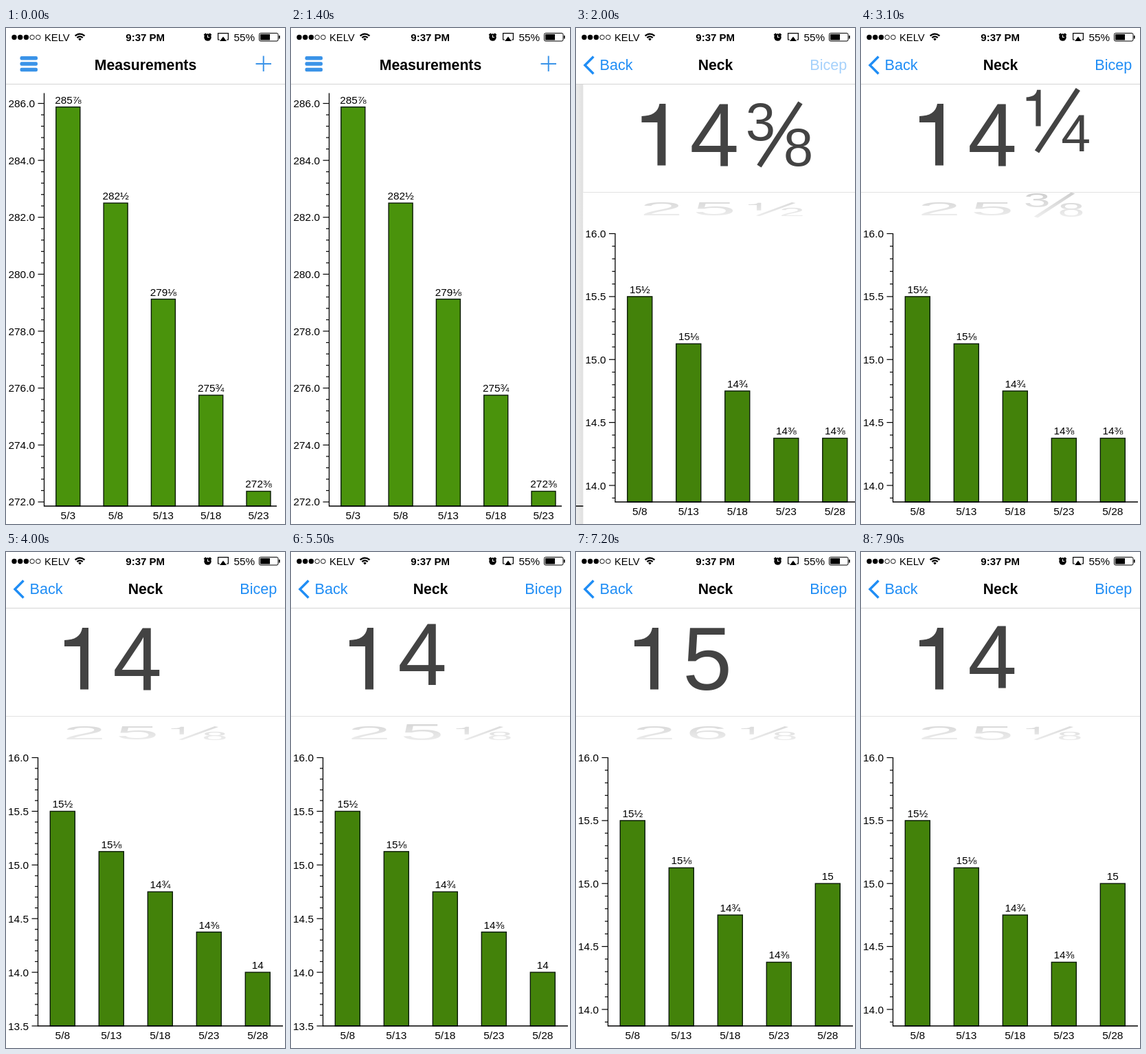
Recreate the animation shown at these times as an HTML page with a canvas. Size 406 px wide and 720 px high, loop 8000 ms.

```html
<!DOCTYPE html>
<html lang="en">
<head>
<meta charset="utf-8">
<title>Measurements</title>
<style>
  html, body { margin: 0; width: 100%; height: 100%; overflow: hidden; background: #fff; }
  canvas { display: block; width: 406px; height: 720px; }
</style>
</head>
<body>
<canvas id="stage"></canvas>
<script>
const W = 406, H = 720, LOOP = 8000, STEP = 100;
const FONT = '"Liberation Sans", Arial, sans-serif';
const BLUE = '#1f8df5', GREEN = '#43820a', BRIGHT_GREEN = '#4a930c', INK = '#434343';
const FRACTIONS = ['', '⅛', '¼', '⅜', '½', '⅝', '¾', '⅞'];
const PUSH_START = 1697;

const canvas = document.getElementById('stage');
const ctx = canvas.getContext('2d');
const ratio = window.devicePixelRatio || 1;
canvas.width = W * ratio;
canvas.height = H * ratio;

const clamp = v => Math.max(0, Math.min(1, v));
const easeInOut = p => p < 0.5 ? 2 * p * p : 1 - 2 * (1 - p) ** 2;
const ramp = (t, start, length) => easeInOut(clamp((t - start) / length));

// Critically damped spring, used for the page push
function spring(t) {
  const x = 18.26 * Math.max(0, t) / 1000;
  return 1 - (1 + x) * Math.exp(-x);
}

function rect(x, y, w, h, color) {
  ctx.fillStyle = color;
  ctx.fillRect(x, y, w, h);
}

function line(color, width, ...points) {
  ctx.strokeStyle = color;
  ctx.lineWidth = width;
  ctx.beginPath();
  points.forEach(([x, y]) => ctx.lineTo(x, y));
  ctx.stroke();
}

function text(str, x, y, size, align = 'left', color = '#000', weight = 'normal') {
  ctx.font = `${weight} ${size}px ${FONT}`;
  ctx.textAlign = align;
  ctx.fillStyle = color;
  ctx.fillText(str, x, y);
}

const format = v => Math.floor(v) + FRACTIONS[Math.round(v % 1 * 8)];

/* ---- bar charts ---- */

const totals = {
  axis: 55.5, top: 94.5, base: 694, right: 394,
  max: 286, maxY: 109.5, unit: 41.32, min: 271.9, minor: 0.4, major: 2,
  firstBar: 90.3, barStep: 69.3, barWidth: 35, dateY: 713,
  dates: ['5/3', '5/8', '5/13', '5/18', '5/23'],
  values: [285.875, 282.5, 279.125, 275.75, 272.375]
};

function neckChart(last) {
  const wide = last < 14.3;
  return {
    axis: 46.5, top: 298, base: 688, right: 403,
    max: 16, maxY: 298.5, unit: wide ? 155.8 : 182.75, min: wide ? 13.5 : 13.88,
    minor: 0.1, major: 0.5,
    firstBar: 82.3, barStep: 71, barWidth: 36, dateY: 707,
    dates: ['5/8', '5/13', '5/18', '5/23', '5/28'],
    values: [15.5, 15.125, 14.75, 14.375, last]
  };
}

function drawChart(c, fill) {
  const yOf = v => c.maxY + (c.max - v) * c.unit;
  const perMajor = Math.round(c.major / c.minor);

  c.values.forEach((v, i) => {
    const x = c.firstBar + i * c.barStep, y = yOf(v), half = c.barWidth / 2;
    rect(x - half, y, c.barWidth, c.base - y, fill);
    ctx.strokeStyle = '#0a1a06';
    ctx.lineWidth = 1.4;
    ctx.strokeRect(x - half, y, c.barWidth, c.base - y);
    text(format(v), x, y - 5, 15.3, 'center');
    text(c.dates[i], x, c.dateY, 15.5, 'center');
  });

  line('#000', 1.3, [c.axis, c.top], [c.axis, c.base], [c.right, c.base]);
  for (let i = 0; ; i++) {
    const v = c.max - i * c.minor, y = yOf(v);
    if (v < c.min - 0.001) break;
    const isMajor = i % perMajor === 0;
    line('#000', 1.2, [c.axis - (isMajor ? 9 : 4.5), y], [c.axis, y]);
    if (isMajor) text(v.toFixed(1), c.axis - 13.5, y + 5.5, 15.4, 'right');
  }
}

/* ---- picker wheel ---- */

function one(x, base, scale) {
  ctx.save();
  ctx.translate(x, base);
  ctx.scale(scale, scale);
  ctx.beginPath();
  ctx.moveTo(-6, 0);
  ctx.lineTo(6, 0);
  ctx.lineTo(6, -89.5);
  ctx.lineTo(-3, -89.5);
  ctx.bezierCurveTo(-5, -77, -14, -72, -29, -71.5);
  ctx.lineTo(-29, -62.5);
  ctx.lineTo(-6, -62.5);
  ctx.fill();
  ctx.restore();
}

function digit(n, x, base, scale) {
  if (n === 1) one(x, base, scale);
  else text(String(n), x, base, 129 * scale, 'center', INK);
}

function fraction(k) {
  const eighths = k % 8;
  if (!eighths) return;
  let num = eighths, den = 8;
  while (num % 2 === 0) { num /= 2; den /= 2; }
  digit(num, 18, 8.5, 0.6);
  digit(den, 73, 45.5, 0.6);
  line(INK, 7.5, [16, 46], [76, -46]);
}

// Rows sit on a cylinder; only the facing half is visible
function wheel(x, position, draw) {
  const radius = 111, pitch = 78 * Math.PI / 180;
  for (let k = Math.floor(position) - 1; k <= position + 2; k++) {
    const angle = (k - position) * pitch, face = Math.cos(angle);
    if (k < 0 || face < 0.02) continue;
    ctx.save();
    ctx.translate(x, 154.5 + radius * Math.sin(angle));
    ctx.scale(0.84 + 0.16 * face, face);
    ctx.fillStyle = INK;
    draw(k);
    ctx.restore();
  }
}

function drawPicker(t) {
  const units = 4 + ramp(t, 5400, 700) - ramp(t, 7303, 650);
  const eighths = 3 - 3 * ramp(t, 2800, 790);
  const drawDigit = k => digit(k % 10, 0, 45, 1);
  wheel(114, 1, drawDigit);
  wheel(191, units, drawDigit);
  wheel(240, eighths, fraction);

  const veil = ctx.createLinearGradient(0, 239, 0, 275);
  veil.addColorStop(0, 'rgba(255,255,255,.74)');
  veil.addColorStop(1, 'rgba(255,255,255,.91)');
  rect(0, 239, W, 54, veil);
  line('#e2e2e2', 1, [0, 238.5], [W, 238.5]);
}

/* ---- pages ---- */

function drawNeckPage(t) {
  const last = t < 3700 ? 14.375 : t < 6300 ? 14 : 15;
  rect(0, 82, W, H - 82, '#fff');
  drawPicker(t);
  drawChart(neckChart(last), GREEN);
}

function drawPages(t) {
  const p = spring(t - PUSH_START), x = W * (1 - p);
  const sliding = x > 0.3;
  if (sliding) {
    ctx.save();
    ctx.translate(-0.3 * W * p, 0);
    drawChart(totals, p > 0 ? GREEN : BRIGHT_GREEN);
    ctx.restore();
    rect(0, 82, W, H, `rgba(0,0,0,${0.08 * p})`);
  }
  if (p <= 0) return;
  if (sliding) {
    const shade = ctx.createLinearGradient(x - 9, 0, x, 0);
    shade.addColorStop(0, 'rgba(0,0,0,0)');
    shade.addColorStop(1, 'rgba(0,0,0,.05)');
    rect(x - 9, 82, 9, H, shade);
  }
  ctx.save();
  ctx.translate(sliding ? x : 0, 0);
  drawNeckPage(t);
  ctx.restore();
}

/* ---- bars at the top ---- */

function circle(x, y, r) {
  ctx.beginPath();
  ctx.arc(x, y, r, 0, Math.PI * 2);
}

function drawStatus() {
  ctx.strokeStyle = ctx.fillStyle = '#000';
  for (let i = 0; i < 5; i++) {
    circle(12 + i * 8.7, 13.5, i < 3 ? 3.7 : 3.3);
    ctx.lineWidth = 0.9;
    i < 3 ? ctx.fill() : ctx.stroke();
  }
  text('KELV', 56, 18.5, 14.8);

  ctx.lineWidth = 2.3;
  [5.6, 9.4].forEach(r => {
    ctx.beginPath();
    ctx.arc(107.5, 18, r, -Math.PI * 0.76, -Math.PI * 0.24);
    ctx.stroke();
  });
  ctx.beginPath();
  ctx.moveTo(107.5, 18.6);
  ctx.arc(107.5, 18, 3, -Math.PI * 0.78, -Math.PI * 0.22);
  ctx.fill();

  text('9:37 PM', 202.7, 18.5, 15, 'center', '#000', 'bold');

  circle(293.5, 13.5, 5.2);
  ctx.fill();
  line('#000', 1.8, [288.3, 10.5], [291, 8]);
  line('#000', 1.8, [296, 8], [298.7, 10.5]);
  line('#fff', 1.1, [293.5, 10.3], [293.5, 13.5], [296, 13.5]);

  line('#000', 1.2, [311, 17], [308.6, 17], [308.6, 7.6], [323.4, 7.6], [323.4, 17], [321, 17]);
  ctx.beginPath();
  ctx.moveTo(316, 12.5);
  ctx.lineTo(321, 19);
  ctx.lineTo(311, 19);
  ctx.fill();

  text('55%', 331.5, 18.5, 15.3);
  ctx.lineWidth = 1;
  ctx.beginPath();
  ctx.roundRect(368.5, 7.5, 27.5, 11.5, 2);
  ctx.stroke();
  rect(370, 9, 14, 8.5, '#000');
  rect(397, 11, 1.6, 4.5, '#000');
}

function title(str) {
  text(str, 203, 61, 21.2, 'center', '#000', 'bold');
}

function drawNav(t) {
  const fade = clamp((t - PUSH_START) / 90);
  if (fade < 1) {
    ctx.globalAlpha = 1 - fade;
    title('Measurements');
    ctx.fillStyle = '#3a93e8';
    [41, 49.3, 57.7].forEach(y => {
      ctx.beginPath();
      ctx.roundRect(20.5, y, 25.5, 5.5, 2.2);
      ctx.fill();
    });
    line('#3a93e8', 2, [363.5, 52], [386, 52]);
    line('#3a93e8', 2, [374.7, 40.5], [374.7, 63]);
  }
  if (fade > 0) {
    ctx.globalAlpha = fade;
    title('Neck');
    line(BLUE, 3.4, [25.5, 41.5], [13, 54], [25.5, 66.5]);
    text('Back', 34.5, 61, 21.6, 'left', BLUE);
    ctx.globalAlpha = clamp((t - 1850) / 375);
    text('Bicep', 394.3, 61, 21.6, 'right', BLUE);
  }
  ctx.globalAlpha = 1;
}

function draw(t) {
  ctx.setTransform(ratio, 0, 0, ratio, 0, 0);
  rect(0, 0, W, H, '#fff');
  drawPages(t);
  rect(0, 0, W, 81, '#fff');
  line('#d4d4d4', 1, [0, 81.5], [W, 81.5]);
  drawStatus();
  drawNav(t);
}

const start = performance.now();
function tick() {
  const t = (performance.now() - start) % LOOP;
  draw(Math.floor(t / STEP) * STEP);
  requestAnimationFrame(tick);
}
tick();
</script>
</body>
</html>
```
